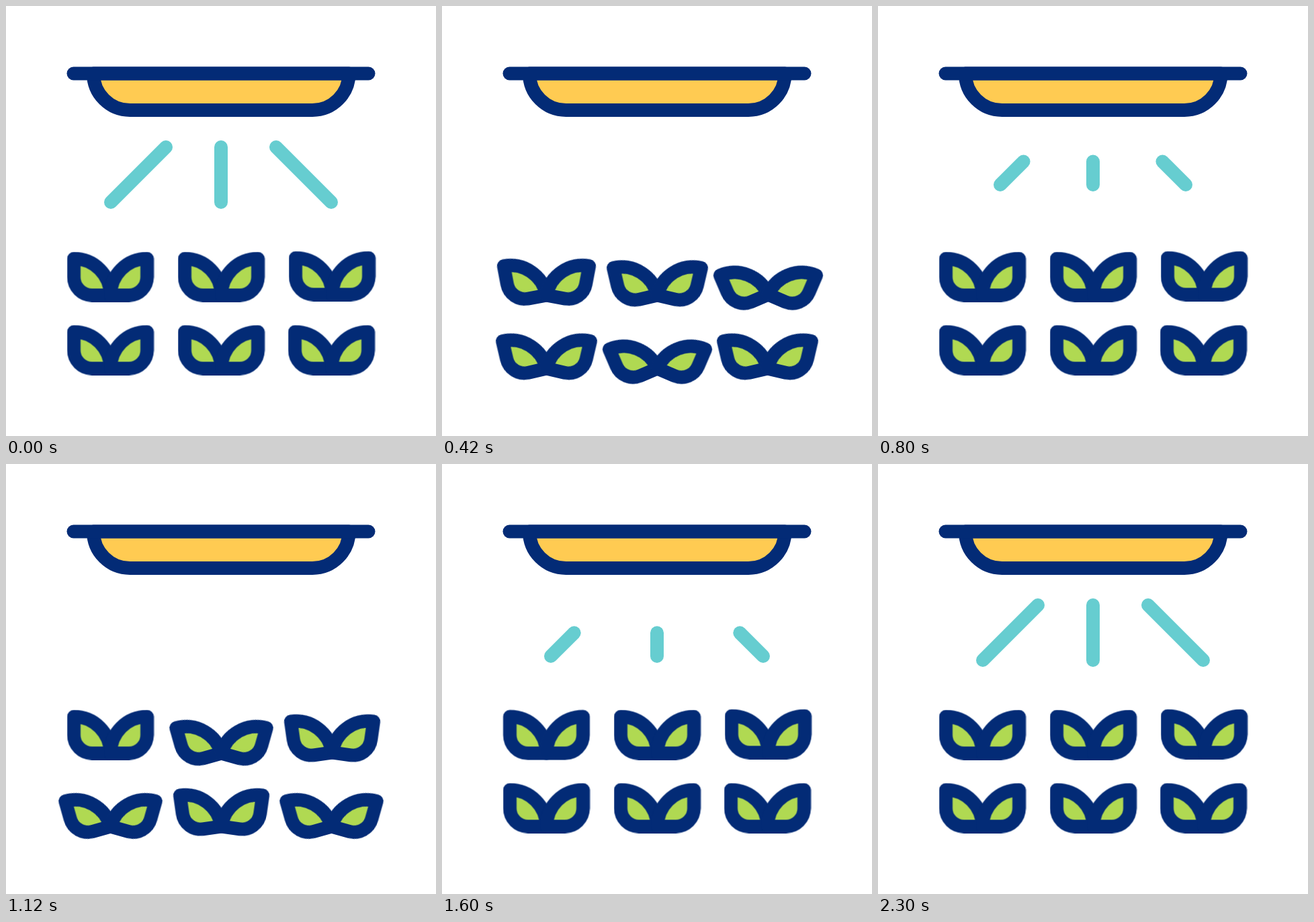
Write an HTML page that moves like this. It is 640x640 px and loops after 2400 ms.

```html
<!DOCTYPE html>
<html lang="en">
<head>
<meta charset="utf-8">
<title>Grow lamp</title>
<style>
  @property --from { syntax: "<length>"; inherits: true; initial-value: 0px; }
  @property --to { syntax: "<length>"; inherits: true; initial-value: 100px; }

  html, body { margin: 0; width: 100%; height: 100%; overflow: hidden; background: #fff; }
  svg { display: block; width: 100vw; height: 100vh; }

  .lamp, .leaf { stroke: #032b76; stroke-width: 20; stroke-linecap: round; stroke-linejoin: round; }
  .lamp { fill: #ffcb52; }
  .leaf { fill: #b0d952; }

  .rays, .plants use { --ease: cubic-bezier(.333, 0, .667, 1); }
  .rays {
    stroke: #66cdd0; stroke-width: 20; stroke-linecap: round;
    animation: ray-from 2.4s var(--ease) infinite, ray-to 2.4s var(--ease) infinite,
               ray-show 2.4s step-end infinite;
  }
  .rays line {
    stroke-dasharray: calc(var(--to) - var(--from)) 300px;
    stroke-dashoffset: calc(-1 * var(--from));
  }
  .plants use { animation: 2.4s var(--ease) infinite; }
  .a use { animation-name: swing-a; }
  .b use { animation-name: swing-b; }
  .c use { animation-name: swing-c; }

  @keyframes ray-from {
    0%, 22.96%, 27.79%, 52.79%, 58.33%, 80.55%, 100% { --from: 0px; }
    16.667%, 44.46%, 75% { --from: 100px; }
  }
  @keyframes ray-to {
    0%, 16.667%, 39.63%, 44.46%, 69.46%, 75%, 95.83%, 100% { --to: 100px; }
    22.96%, 52.79%, 80.55% { --to: 0px; }
  }
  @keyframes ray-show {
    0%, 22.96%, 52.79%, 80.55% { opacity: 1; }
    16.667%, 44.46%, 75% { opacity: 0; }
  }
  @keyframes swing-a {
    0%, 13.04%, 33.04%, 46.75%, 66.75%, 100% { transform: rotate(0deg); }
    23.04%, 56.75% { transform: rotate(-25deg); }
  }
  @keyframes swing-b {
    0%, 12.375%, 32.375%, 40.83%, 60.83%, 100% { transform: rotate(0deg); }
    22.375%, 50.83% { transform: rotate(-25deg); }
  }
  @keyframes swing-c {
    0%, 9.17%, 29.17%, 42.92%, 62.92%, 100% { transform: rotate(0deg); }
    19.17%, 52.92% { transform: rotate(-25deg); }
  }
</style>
</head>
<body>
<svg viewBox="0 0 640 640">
  <defs>
    <path id="leaf" class="leaf" d="M-54.5-54.5A54.5 54.5 0 0 1 0 0H-27.5A27 27 0 0 1-54.5-27Z"/>
  </defs>

  <g class="lamp">
    <path d="M130 100.5A54.5 54.5 0 0 0 184.5 155H456A54.5 54.5 0 0 0 510.5 100.5Z"/>
    <path d="M100.5 100.5H539.5"/>
  </g>

  <g class="rays">
    <line x1="238" y1="210" x2="156" y2="292" pathLength="100"/>
    <line x1="320" y1="210" x2="320" y2="292" pathLength="100"/>
    <line x1="402" y1="210" x2="484" y2="292" pathLength="100"/>
  </g>

  <g class="plants">
    <g class="a" transform="translate(155.5 430.5)"><use href="#leaf"/><g transform="scale(-1 1)"><use href="#leaf"/></g></g>
    <g class="b" transform="translate(320.5 430.5)"><use href="#leaf"/><g transform="scale(-1 1)"><use href="#leaf"/></g></g>
    <g class="c" transform="translate(485.5 429.5)"><use href="#leaf"/><g transform="scale(-1 1)"><use href="#leaf"/></g></g>
    <g class="b" transform="translate(155.5 539.5)"><use href="#leaf"/><g transform="scale(-1 1)"><use href="#leaf"/></g></g>
    <g class="c" transform="translate(320.5 539.5)"><use href="#leaf"/><g transform="scale(-1 1)"><use href="#leaf"/></g></g>
    <g class="b" transform="translate(484.5 539.5)"><use href="#leaf"/><g transform="scale(-1 1)"><use href="#leaf"/></g></g>
  </g>
</svg>
</body>
</html>
```
